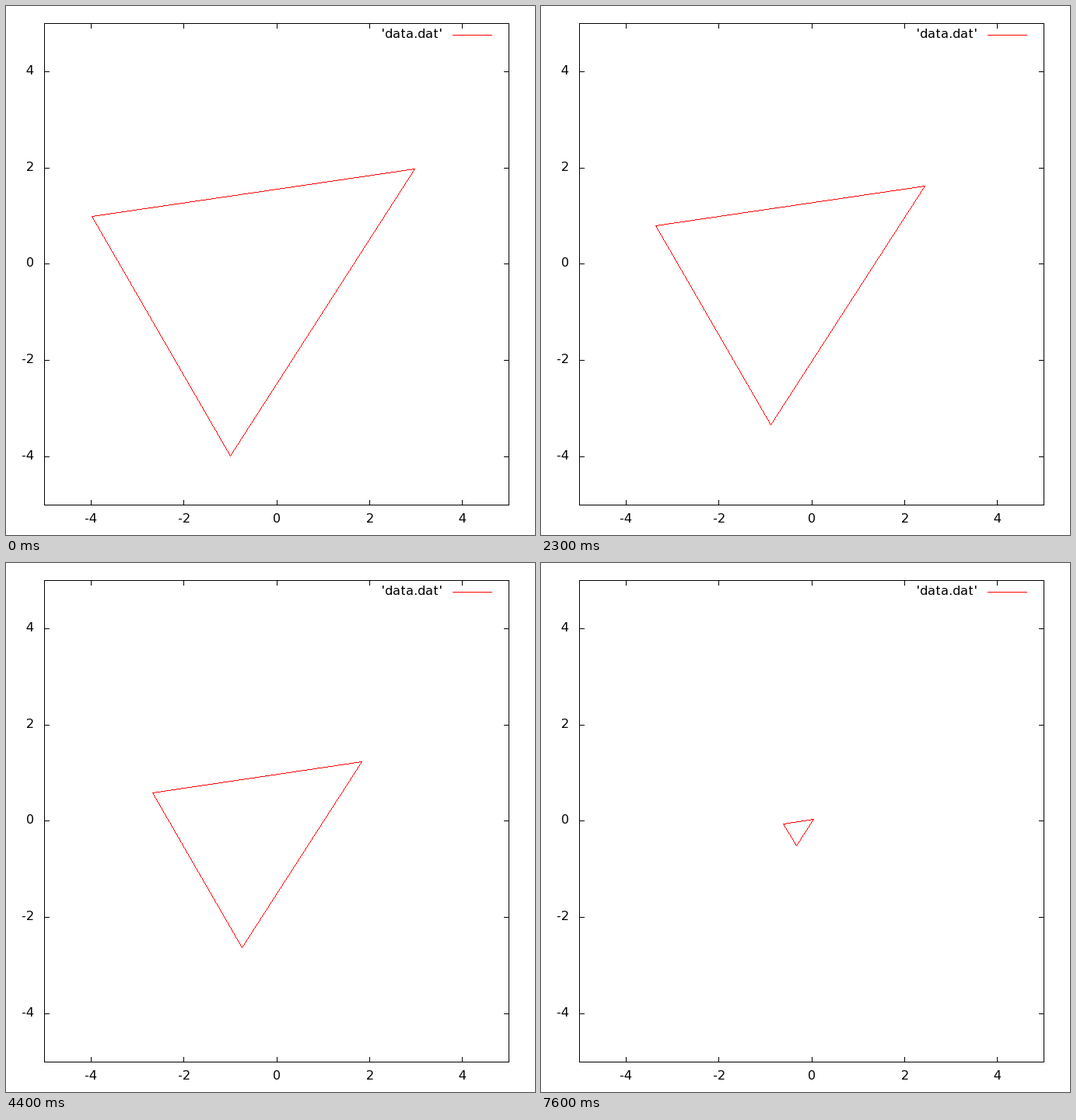
A matplotlib script that plays this animation: 680 by 680 pixels, repeating every 7.7 s.

```python
import numpy as np
import matplotlib.pyplot as plt
from matplotlib.animation import FuncAnimation

SIZE, DPI = 680, 100
FRAMES, INTERVAL = 77, 100
LEFT, RIGHT, TOP, BOTTOM = 49, 646, 22, 641
TICK = 6
STEP = 0.1
PX = 72 / DPI

START = np.array([[-4, 1], [3, 2], [-1, -4]], float)

# Full hinting keeps the label stems thin and crisp.
plt.rcParams["text.hinting"] = "force_autohint"
plt.rcParams["text.hinting_factor"] = 1


def circumcenter(a, b, c):
    m = 2 * np.array([b - a, c - a])
    return np.linalg.solve(m, [b @ b - a @ a, c @ c - a @ a])


CENTER = circumcenter(*START)
RADIUS = np.linalg.norm(START[0] - CENTER)


def to_px(x, y):
    """Map data units in [-5, 5] to whole pixels, y pointing down."""
    px = LEFT + np.floor((x + 5) / 10 * (RIGHT - LEFT) + 0.5)
    py = BOTTOM - np.floor((y + 5) / 10 * (BOTTOM - TOP) + 0.5)
    return px, py


def triangle(n):
    """Each corner moves inward at a speed equal to its curvature 1/r."""
    r = RADIUS
    for _ in range(n + 1):
        r -= STEP / r
    return CENTER + (START - CENTER) * r / RADIUS


def raster(p, q):
    """Whole-pixel points along the segment p-q."""
    count = int(np.abs(q - p).max()) + 1
    return np.floor(np.linspace(p, q, count) + 0.5)


fig = plt.figure(figsize=(SIZE / DPI, SIZE / DPI), dpi=DPI, facecolor="white")
ax = fig.add_axes([0, 0, 1, 1])
ax.set(xlim=(0, SIZE), ylim=(SIZE, 0))
ax.axis("off")


def stroke(xs, ys, color="black"):
    # Snapping moves whole coordinates to the pixel centre.
    ax.plot(xs, ys, color=color, lw=PX, antialiased=False, snap=True,
            solid_capstyle="projecting", solid_joinstyle="miter")


def label(x, y, s, ha):
    ax.text(x, y, s, ha=ha, va="baseline", family="DejaVu Sans",
            fontsize=16 * PX, color="black")


stroke([LEFT, RIGHT, RIGHT, LEFT, LEFT], [TOP, TOP, BOTTOM, BOTTOM, TOP])
for v in range(-4, 5, 2):
    x, y = to_px(v, v)
    stroke([x, x], [BOTTOM, BOTTOM - TICK])
    stroke([x, x], [TOP, TOP + TICK])
    stroke([LEFT, LEFT + TICK], [y, y])
    stroke([RIGHT, RIGHT - TICK], [y, y])
    label(x + 0.5, 664, str(v), "center")
    label(36, y + 4, str(v), "right")

label(561, 41, "'data.dat'", "right")
stroke([574, 624], [37, 37], "red")

outline, = ax.plot([], [], ",", color="red")


def draw(n):
    corners = np.column_stack(to_px(*triangle(n).T))
    sides = zip(corners, np.roll(corners, -1, axis=0))
    x, y = np.vstack([raster(p, q) for p, q in sides]).T
    outline.set_data(x, y + 1)  # pixel markers sit above their anchor
    return outline,


anim = FuncAnimation(fig, draw, frames=FRAMES, interval=INTERVAL,
                     repeat=True, repeat_delay=0, blit=False)
plt.show()
```
